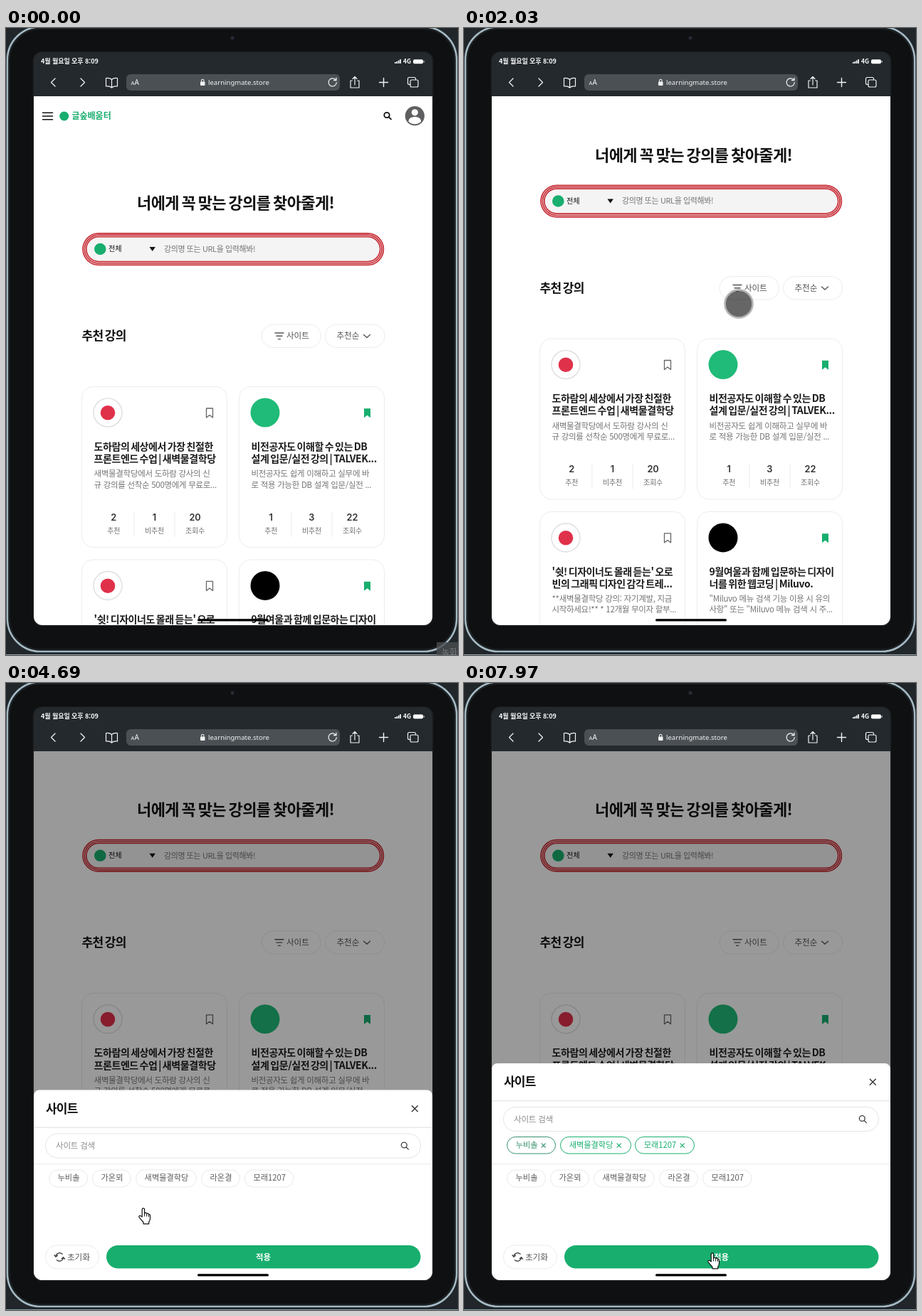
Animation, 635 px wide and 882 px high, one loop 8 s. Source, as an HTML page:

```html
<!DOCTYPE html>
<html lang="ko">
<head>
<meta charset="utf-8">
<title>강의 추천 화면</title>
<style>
html, body { margin: 0; width: 100%; height: 100%; overflow: hidden; background: #20262a; }
svg { display: block; width: 635px; height: 882px; }
text { font-family: 'Noto Sans CJK KR', 'Noto Sans CJK JP', 'Noto Sans', sans-serif; white-space: pre; }
.num { font-family: Inter, sans-serif; }
.url { font-family: 'Noto Sans', sans-serif; }
</style>
</head>
<body>
<svg id="stage" viewBox="0 0 635 882"></svg>
<script>
const GREEN = '#18ae6e', LINE = '#ececec';
const stage = document.getElementById('stage');

// Text is placed by its left edge (or anchor) and its vertical centre.
const text = (x, cy, size, str, { w = 400, c = '#111', ls = 0, ws = 0, a = 'start', cls = '' } = {}) =>
  `<text x="${x}" y="${cy + size * 0.37}" font-size="${size}" font-weight="${w}" fill="${c}" letter-spacing="${ls}" word-spacing="${ws}" text-anchor="${a}" class="${cls}">${str}</text>`;
const rect = (x, y, w, h, r, fill = 'none', stroke = 'none', sw = 1) =>
  `<rect x="${x}" y="${y}" width="${w}" height="${h}" rx="${r}" fill="${fill}" stroke="${stroke}" stroke-width="${sw}"/>`;
const disc = (x, y, r, fill, stroke = 'none', sw = 1) =>
  `<circle cx="${x}" cy="${y}" r="${r}" fill="${fill}" stroke="${stroke}" stroke-width="${sw}"/>`;
const line = (d, stroke, sw = 1.3) =>
  `<path d="${d}" fill="none" stroke="${stroke}" stroke-width="${sw}" stroke-linecap="round" stroke-linejoin="round"/>`;
const shape = (d, fill) => `<path d="${d}" fill="${fill}"/>`;
const group = (id, body, extra = '') => `<g id="${id}" ${extra}>${body}</g>`;
const cross = (x, y, r, c, sw) => line(`M${x - r} ${y - r}l${2 * r} ${2 * r}m0 ${-2 * r}l${-2 * r} ${2 * r}`, c, sw);
const lens = (x, y, r, c, sw) =>
  disc(x, y, r, 'none', c, sw) + line(`M${x + r * 0.75} ${y + r * 0.75}l3.2 3.2`, c, sw);

function device() {
  return rect(0, 0, 635, 882, 0, '#20262a') +
    rect(2, -1.5, 631, 878.5, 46, '#0f1011', '#a5bac4', 2.6) +
    rect(4.5, 1, 626, 873.5, 43.5, 'none', '#1e2326', 2) +
    rect(0, 881, 635, 1, 0, '#8aa0ab') +
    rect(37.5, 33, 563, 808.5, 13, '#1b1c1d') +
    disc(318, 14, 3, '#1d1f24') + disc(318, 14, 1.3, '#34384f');
}

function toolbar() {
  const ink = '#f2f3f3';
  const bars = [2, 3, 4.5, 6].map((h, i) => rect(546 + i * 2.4, 50 - h, 1.7, h, 0.4, '#fff')).join('');
  return rect(39, 34, 560, 62, 0, '#23292d') +
    text(49, 47, 9, '4월 월요일 오후 8:09', { w: 700, c: '#fff', ls: -0.05 }) + bars +
    text(558, 47.3, 8.5, '4G', { w: 700, c: '#fff' }) +
    rect(572, 44.3, 14, 6, 2, '#fff') + rect(586.6, 46, 1.2, 2.6, 0.6, '#ccc') +
    line('M69 71l-5.5 5.5 5.5 5.5M105 71l5.5 5.5-5.5 5.5', ink) +
    line('M148.500 72.500c-2-2-5-2.500-8-2v11.500c3-.5 6 0 8 2 2-2 5-2.500 8-2v-11.500c-3-.5-6 0-8 2v11.500', ink, 1.2) +
    rect(169, 65, 300, 23, 6, '#4b5054') +
    text(175.5, 77.5, 7.5, 'A', { c: ink, w: 500, cls: 'url' }) + text(180.5, 76.7, 10, 'A', { c: ink, w: 500, cls: 'url' }) +
    rect(273, 75.5, 6.5, 5.5, 1, ink) + line('M274.500 75.500v-1.500a1.750 1.750 0 0 1 3.500 0v1.500', ink, 1.1) +
    text(284, 76.2, 9.55, 'learningmate.store', { c: ink, cls: 'url' }) +
    line('M463.500 73.500a5.600 5.600 0 1 0 .8 3M464 70v3.600h-3.600', ink, 1.2) +
    line('M486.500 74h-2.500v10h12v-10h-2.500M490 80v-11.500m-3 3l3-3 3 3', ink, 1.2) +
    line('M530.500 70.500v12m-6-6h12', ink, 1.4) +
    rect(568, 73, 11, 10, 2, '#23292d', ink, 1.2) + line('M568 79.500h-1.500a2 2 0 0 1-2-2v-6a2 2 0 0 1 2-2h7a2 2 0 0 1 2 2v1', ink, 1.2);
}

const mark = {
  red: disc(36.5, 37, 20, '#fff', '#e1e1e1', 1.6) + disc(36.5, 37.3, 10.3, '#e0314a'),
  green: disc(36.5, 37, 20.5, '#20bb78'),
  black: disc(36.5, 37, 20.5, '#000')
};

function card({ x, y, logo, saved, title, desc, stats }) {
  const body = rect(0, 0.5, 204, 226, 16, '#fff', LINE) + mark[logo] +
    (saved ? shape('M175.500 31.300h9v13l-4.500-3.500-4.500 3.500z', GREEN) : line('M175 31h9v13l-4.500-3.500-4.500 3.500z', '#666', 1.3)) +
    title.map((s, i) => text(17, 84.5 + i * 17.3, 14, s, { w: 600, c: '#1c1c1c', ls: -0.42, ws: -1.7 })).join('') +
    desc.map((s, i) => text(17, 123 + i * 15.3, 11.5, s, { c: '#757575', ls: -0.3 })).join('') +
    ['추천', '비추천', '조회수'].map((s, i) => {
      const cx = 44.7 + i * 57.2;
      return text(cx, 184, 12.8, stats[i], { w: 600, c: '#333', a: 'middle', cls: 'num' }) +
        text(cx, 203, 10, s, { c: '#6f6f6f', ls: -0.2, a: 'middle' }) +
        (i ? rect(cx - 29, 176, 1, 36, 0, LINE) : '');
    }).join('');
  return `<g transform="translate(${x} ${y})">${body}</g>`;
}

const cards = [
  { x: 106.5, y: 504, logo: 'red', stats: [2, 1, 20],
    title: ['도하람의 세상에서 가장 친절한', '프론트엔드 수업 | 새벽물결학당'],
    desc: ['새벽물결학당에서 도하람 강사의 신', '규 강의를 선착순 500명에게 무료로...'] },
  { x: 327.5, y: 504, logo: 'green', saved: true, stats: [1, 3, 22],
    title: ['비전공자도 이해할 수 있는 DB', '설계 입문/실전 강의 | TALVEK...'],
    desc: ['비전공자도 쉽게 이해하고 실무에 바', '로 적용 가능한 DB 설계 입문/실전 ...'] },
  { x: 106.5, y: 747.4, logo: 'red', stats: [1, 0, 14],
    title: ["'쉿! 디자이너도 몰래 듣는' 오로", '빈의 그래픽 디자인 감각 트레...'],
    desc: ['**새벽물결학당 강의: 자기계발, 지금', '시작하세요!** * 12개월 무이자 할부...'] },
  { x: 327.5, y: 747.4, logo: 'black', saved: true, stats: [1, 0, 16],
    title: ['9월여울과 함께 입문하는 디자이', '너를 위한 웹코딩 | Miluvo.'],
    desc: ['"Miluvo 메뉴 검색 기능 이용 시 유의', '사항" 또는 "Miluvo 메뉴 검색 시 주...'] }
];

function page() {
  const rings = [0, 2.4, 4.8].map(d =>
    rect(108 + d, 288.8 + d, 422.4 - 2 * d, 44.6 - 2 * d, 22.3 - d, d > 4 ? '#f4f4f4' : '#fbe9ea', '#c8323b', 1.7)).join('');
  const pill = x => rect(x, 417, 83.5, 32.5, 16.25, '#fff', LINE);
  const label = { w: 500, c: '#555', ls: -0.1 };
  return line('M51.500 119.300h14M51.500 124h14M51.500 128.700h14', '#111', 1.6) +
    disc(81.7, 124, 6.5, GREEN) + text(92.5, 124, 12, '글숲배움터', { w: 700, c: GREEN }) +
    lens(535, 122.5, 3.7, '#111', 1.8) +
    disc(574.3, 123.7, 13.6, '#5f5f61') + disc(574.3, 118.8, 4.6, '#fff') +
    shape('M565.500 131.500c0-4.500 4-6.500 8.800-6.500s8.800 2 8.800 6.500c-4.500 5-13 5-17.600 0z', '#fff') +
    text(184, 246, 22, '너에게 꼭 맞는 강의를 찾아줄게!', { w: 700, ls: -0.6, ws: -2 }) +
    rings + disc(132.3, 311, 8.3, GREEN) + text(144, 310.5, 10.2, '전체', { w: 500 }) +
    shape('M201.500 308h8.400l-4.200 6z', '#111') +
    text(222, 310.8, 11, '강의명 또는 URL을 입력해봐!', { c: '#757575', ls: -0.4 }) +
    text(106.5, 433, 17, '추천 강의', { w: 700, ls: -0.6, ws: -2 }) +
    pill(359) + line('M378 429h12M380 433.300h8M382.500 437.600h3', '#555', 1.4) + text(394, 433, 11.6, '사이트', label) +
    pill(448.5) + text(464.5, 433, 11.6, '추천순', label) + line('M502.500 431.500l4.500 4 4.500-4', '#555', 1.4) +
    cards.map(card).join('');
}

const sites = [['누비솔', 61, 54], ['가온뫼', 122, 54], ['새벽물결학당', 183, 85], ['라온결', 275, 54], ['모래1207', 336, 68.5]];
const picked = [['누비솔', 61, 68, '#37936d', 5380], ['새벽물결학당', 136, 99, GREEN, 6200], ['모래1207', 241, 83, GREEN, 7590]];

function sheet() {
  const head = shape('M39 890v-309.500a8 8 0 0 1 8-8h544a8 8 0 0 1 8 8v309.500z', '#fff') +
    text(56, 598.7, 17, '사이트', { w: 700, ls: -0.8 }) + cross(574.3, 598.7, 4, '#333', 1.4) +
    rect(39, 624.5, 560, 1.5, 0, '#e9e9e9') +
    rect(55.5, 634, 527, 34, 17, '#fff', '#e2e5e4') +
    text(70, 650.8, 11.5, '사이트 검색', { c: '#8a8a8a', ls: -0.2 }) + lens(559.3, 650, 3.9, '#444', 1.4);
  const chips = sites.map(([s, x, w]) =>
    rect(x - 0.5, 685, w, 24, 12, '#fff', '#e9e9e9') +
    text(x + w / 2, 695.7, 11.2, s, { c: '#5c5c5c', a: 'middle' })).join('');
  const tags = picked.map(([s, x, w, c], i) => group('tag' + i,
    rect(x - 0.5, 638.5, w, 23.5, 11.75, '#fff', c) + text(x + 11.7, 650.3, 11.2, s, { w: 500, c }) +
    cross(x + w - 17.3, 650.5, 2.7, c, 1.2))).join('');
  return group('head', head) + rect(39, 676, 560, 1, 0, LINE) + chips + tags +
    rect(55.5, 791, 75, 33, 16.5, '#fff', LINE) +
    line('M70 806.500a5.400 5.400 0 0 1 9-3.200M80.500 808.500a5.400 5.400 0 0 1-9 3.200M68 804.800l2 2.400 2.300-2M82.500 810.200l-2-2.400-2.300 2', '#444', 1.4) +
    text(86, 807.3, 11.6, '초기화', { w: 500, c: '#555', ls: -0.1 }) +
    rect(141, 791, 441.5, 32.5, 16.25, GREEN) +
    text(361.5, 807.3, 11.4, '적용', { w: 600, c: '#fff', a: 'middle' });
}

const pointers =
  group('touch', `<circle r="19.5" fill="#000" fill-opacity=".6" stroke="#b4b4b4" stroke-opacity=".9" stroke-width="2.8"/>`) +
  group('arrow', '<path d="M.5.5V15.500L4 12.300 6.300 17.500 8.600 16.400 6.400 11.400H11Z" fill="#fff" stroke="#111"/>') +
  group('hand', '<path d="M5.200 13V2.600a1.700 1.700 0 0 1 3.400 0V8.500q.3-1.600 1.800-1.400q1.300.2 1.300 1.600q.6-1 1.800-.6q1 .3 1 1.600q1.800-.6 2 1.200V15q0 3-1.800 5V22.800H7V20.500L1.200 13.800q-1-1.600.3-2.300q1-.5 2 .3Z" fill="#fff" stroke="#111" stroke-width="1.200" stroke-linejoin="round"/>' +
    line('M8.600 8.500v3.500M11.700 8.700v3.500M14.500 9.700v2.800', '#111', 1));

stage.innerHTML =
  '<defs><clipPath id="screen"><rect x="39" y="34" width="560" height="806" rx="12"/></clipPath>' +
  '<clipPath id="view"><rect x="39" y="96" width="560" height="744"/></clipPath></defs>' + device() +
  `<g clip-path="url(#screen)">${toolbar()}<g clip-path="url(#view)">${rect(39, 96, 560, 744, 0, '#fff')}` +
  group('page', page()) + group('modal', rect(39, 96, 560, 744, 0, 'rgba(0,0,0,.4)') + sheet()) +
  `</g>${rect(269, 831.3, 100, 3.2, 1.6, '#000')}</g>` +
  group('tip', rect(605, 864, 30, 18, 0, '#4a4d50') + text(612, 879, 12, '녹화', { c: '#8d9194' }), 'opacity=".8"') + pointers;

const $ = id => document.getElementById(id);
const el = Object.fromEntries(['page', 'modal', 'head', 'tip', 'touch', 'arrow', 'hand', 'tag0', 'tag1', 'tag2'].map(id => [id, $(id)]));

// Pointer moves: start, number of steps, points on the path.
const STEP = 69.5, LOOP = 8000;
const moves = [
  [380, 11, [[612, 875], [600, 780], [560, 570], [460, 450], [345, 408], [326, 383]]],
  [1340, 3, [[326, 383], [386, 388]]],
  [2170, 5, [[386, 388], [396.5, 363]]],
  [2910, 1, [[397, 363], [397, 363]]],
  [3790, 11, [[397, 363], [470, 349], [606, 430], [530, 600], [400, 680], [320, 692]]],
  [4620, 8, [[320, 692], [186, 738], [125, 732], [98, 711], [86, 698]]],
  [5450, 7, [[86, 698], [160, 694], [224, 688.5]]],
  [6270, 3, [[224, 688.5], [227, 688.5], [224.5, 689]]],
  [6660, 10, [[224.5, 689], [290, 695], [355, 698]]],
  [7660, 5, [[355, 698], [358, 750], [342, 801]]]
];
const scrolls = [0, 24, 55, 67.5, 67.7, 67.8, 67.9, 68, 68, 68.2];

const stepsDone = (t, start, n) => Math.max(0, Math.min(n, Math.floor((t - start) / STEP) + 1));

// Smooth curve through the points, p from 0 to 1.
function along(pts, p) {
  const s = p * (pts.length - 1), i = Math.min(Math.floor(s), pts.length - 2), u = s - i;
  const at = k => pts[Math.max(0, Math.min(pts.length - 1, k))];
  const [a, b, c, d] = [at(i - 1), at(i), at(i + 1), at(i + 2)];
  return [0, 1].map(k => b[k] + u / 2 * (c[k] - a[k] +
    u * (2 * a[k] - 5 * b[k] + 4 * c[k] - d[k] + u * (3 * (b[k] - c[k]) + d[k] - a[k]))));
}

const show = (node, on) => node.setAttribute('visibility', on ? 'visible' : 'hidden');
const shift = (node, x, y) => node.setAttribute('transform', `translate(${x} ${y})`);

function draw(t) {
  shift(el.page, 0, -scrolls[stepsDone(t, 1890, 9)]);
  show(el.modal, t >= 2910);
  shift(el.head, 0, t >= 5380 ? -37.5 : 0);
  picked.forEach((tag, i) => show(el['tag' + i], t >= tag[4]));
  show(el.tip, t < 120);
  el.tip.setAttribute('opacity', t < 70 ? 0.8 : 0.4);

  const move = moves.findLast(m => t >= m[0]);
  let kind = '';
  if (move) {
    const [x, y] = along(move[2], stepsDone(t, move[0], move[1]) / move[1]);
    kind = t < 2910 ? 'touch' : y < 572 ? 'arrow' : 'hand';
    shift(el[kind], x, y);
  }
  ['touch', 'arrow', 'hand'].forEach(k => show(el[k], k === kind));
  el.touch.firstChild.setAttribute('fill-opacity', t >= 2650 && t < 2710 ? 0.75 : 0.6);
}

const began = performance.now();
function tick() {
  draw((performance.now() - began) % LOOP);
  requestAnimationFrame(tick);
}
tick();
</script>
</body>
</html>
```
